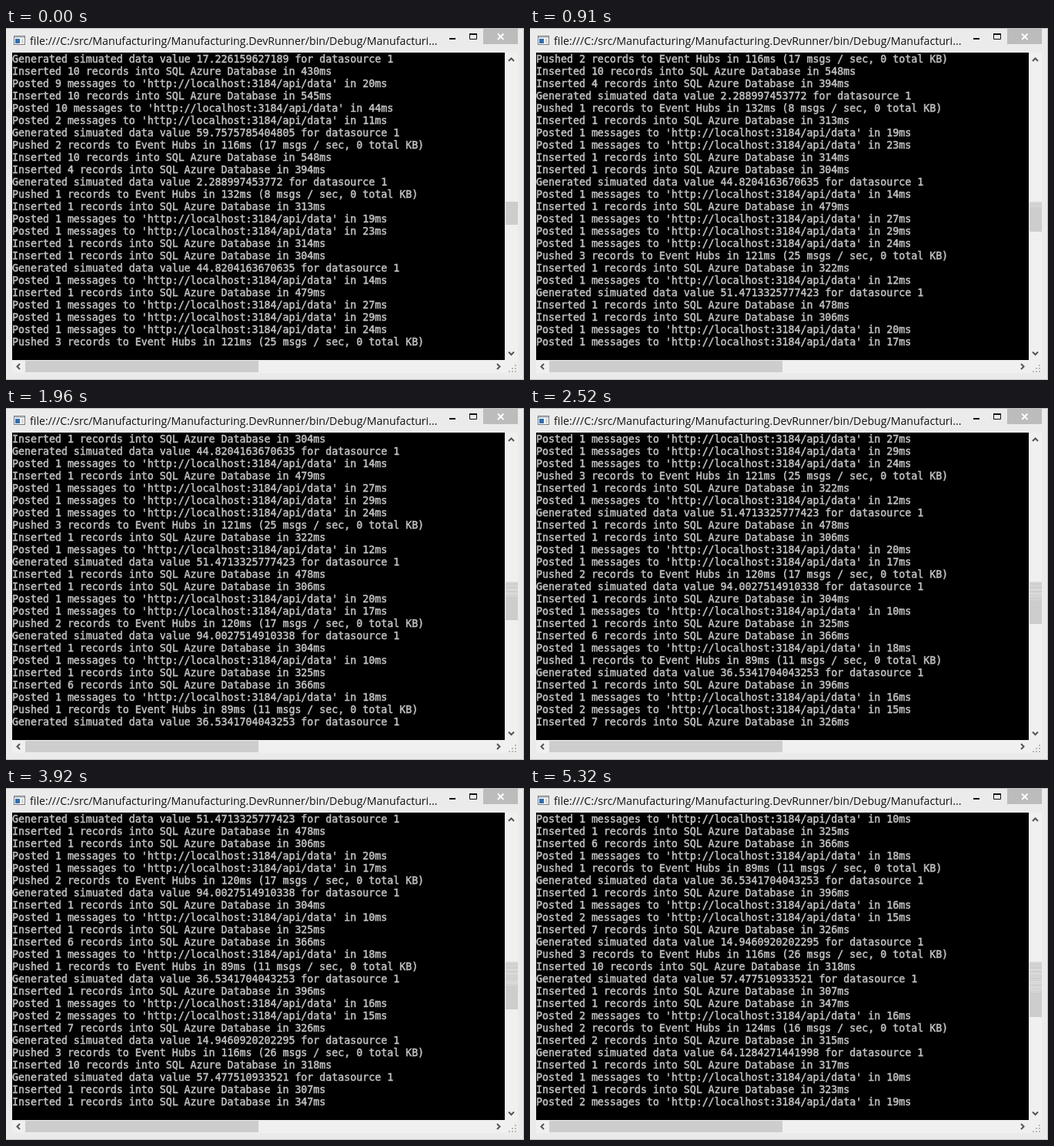
An HTML page that plays this animation: 673 by 458 pixels, repeating every 5.39 s.

```html
<!DOCTYPE html>
<html lang="en">
<head>
<meta charset="utf-8">
<title>Console log</title>
<style>
  html, body { margin: 0; width: 100%; height: 100%; overflow: hidden; background: #ebebeb; }
  svg, pre { position: absolute; left: 0; top: 0; }
  pre {
    left: 8px; top: 32px; width: 640px; height: 400px; margin: 0; overflow: hidden;
    box-sizing: border-box; padding-top: 1px;
    background: #000; color: #c0c0c0;
    font: 13.288px/16px "DejaVu Sans Mono", monospace;
    -webkit-text-stroke: .5px #c0c0c0;
  }
  .title { font: 14.16px "Open Sans", sans-serif; fill: #111; }
  .arrow { fill: none; stroke: #555; stroke-width: 2; }
</style>
</head>
<body>
<svg width="673" height="458">
  <path d="M0 .5H672.5V457.5H0" fill="none" stroke="#bdbdbd"/>
  <g>
    <rect x="10.5" y="10.5" width="14" height="11" fill="#fff" stroke="#777"/>
    <path d="M11 11h13v2h-13z" fill="#b9c4d0"/>
    <path d="M12 14h6v6h-6z" fill="#2f6fb0"/>
    <path d="M20 15h3M20 17h3M20 19h3" stroke="#aaa"/>
  </g>
  <text class="title" x="31" y="22">file:///C:/src/Manufacturing/Manufacturing.DevRunner/bin/Debug/Manufacturi...</text>
  <path d="M576 13h8v2h-8z" fill="#111"/>
  <path d="M602.5 8v6.5h9V8" fill="none" stroke="#111"/>
  <path d="M602 7h10v2h-10z" fill="#111"/>
  <path d="M620 1h45v20h-45z" fill="#bcbcbc"/>
  <path d="M639 7.5l7.500 7.500m0-7.500l-7.500 7.500" stroke="#fff" stroke-width="1.800"/>
  <path d="M648 32h17v417H8v-17h640z" fill="#f0f0f0"/>
  <path d="M25 433h303v15H25z" fill="#cdcdcd"/>
  <g class="arrow">
    <path d="M653 43l3.500-3.500 3.500 3.500"/>
    <path d="M653 421.500l3.500 3.500 3.500-3.500"/>
    <path d="M18 437l-3.500 3.500 3.500 3.500"/>
    <path d="M638 437l3.500 3.500-3.500 3.500"/>
  </g>
  <path d="M661 438h2v2h-2zM661 442h2v2h-2zM661 446h2v2h-2zM657 442h2v2h-2zM657 446h2v2h-2zM653 446h2v2h-2z" fill="#b8b8b8"/>
  <rect id="thumb" x="649" y="226" width="16" fill="#cdcdcd"/>
  <path id="trail" stroke="#dadada"/>
</svg>
<pre id="console"></pre>
<script>
const LOOP = 5390, ROWS = 24, THUMB_TOP = 226, THUMB_HEIGHT = 30, THUMB_STEP = 1.23;

const writers = {
  G: value => `Generated simuated data value ${value} for datasource 1`,
  I: (count, ms) => `Inserted ${count} records into SQL Azure Database in ${ms}ms`,
  P: (count, ms) => `Posted ${count} messages to 'http://localhost:3184/api/data' in ${ms}ms`,
  H: (count, ms, rate) => `Pushed ${count} records to Event Hubs in ${ms}ms (${rate} msgs / sec, 0 total KB)`
};

// One entry per console line: a kind, then its values
const log = `G17.226159627189 I10,430 P9,20 I10,545 P10,44 P2,11
  G59.7575785404805 H2,116,17 I10,548 I4,394
  G2.288997453772 H1,132,8 I1,313 P1,19 P1,23 I1,314 I1,304
  G44.8204163670635 P1,14 I1,479 P1,27 P1,29 P1,24 H3,121,25 I1,322 P1,12
  G51.4713325777423 I1,478 I1,306 P1,20 P1,17 H2,120,17
  G94.0027514910338 I1,304 P1,10 I1,325 I6,366 P1,18 H1,89,11
  G36.5341704043253 I1,396 P1,16 P2,15 I7,326
  G14.9460920202295 H3,116,26 I10,318
  G57.477510933521 I1,307 I1,347 P2,16 H2,124,16 I2,315
  G64.1284271441998 I1,317 P1,10 I1,323 P2,19`
  .split(/\s+/).map(entry => writers[entry[0]](...entry.slice(1).split(",")));

// Time in ms : first visible line
const scrolls = `0:0 140:1 210:3 560:5 910:7 980:8 1120:9 1190:11 1470:12 1820:13 1890:15
  1960:16 2170:19 2520:20 2870:21 3430:22 3640:23 3780:24 3920:26 4270:27 4340:28
  4550:29 4690:30 4970:32 5320:34`
  .split(/\s+/).map(step => step.split(":").map(Number));

const byId = id => document.getElementById(id);
const output = byId("console"), thumb = byId("thumb"), trail = byId("trail");
const thumbY = line => Math.round(THUMB_TOP + line * THUMB_STEP);
let shown = -1;

function draw(time) {
  const past = scrolls.filter(([start]) => start <= time);
  const top = past.pop()[1];
  if (top === shown) return;
  shown = top;
  output.textContent = log.slice(top, top + ROWS).join("\n");
  thumb.setAttribute("height", thumbY(top) + THUMB_HEIGHT - THUMB_TOP);
  // The scrolled thumb leaves faint lines behind
  trail.setAttribute("d", past.map(([, line]) => `M649 ${thumbY(line) + .5}h16`).join(""));
}

const begin = performance.now();
function tick() {
  draw((performance.now() - begin) % LOOP);
  requestAnimationFrame(tick);
}
tick();
</script>
</body>
</html>
```
